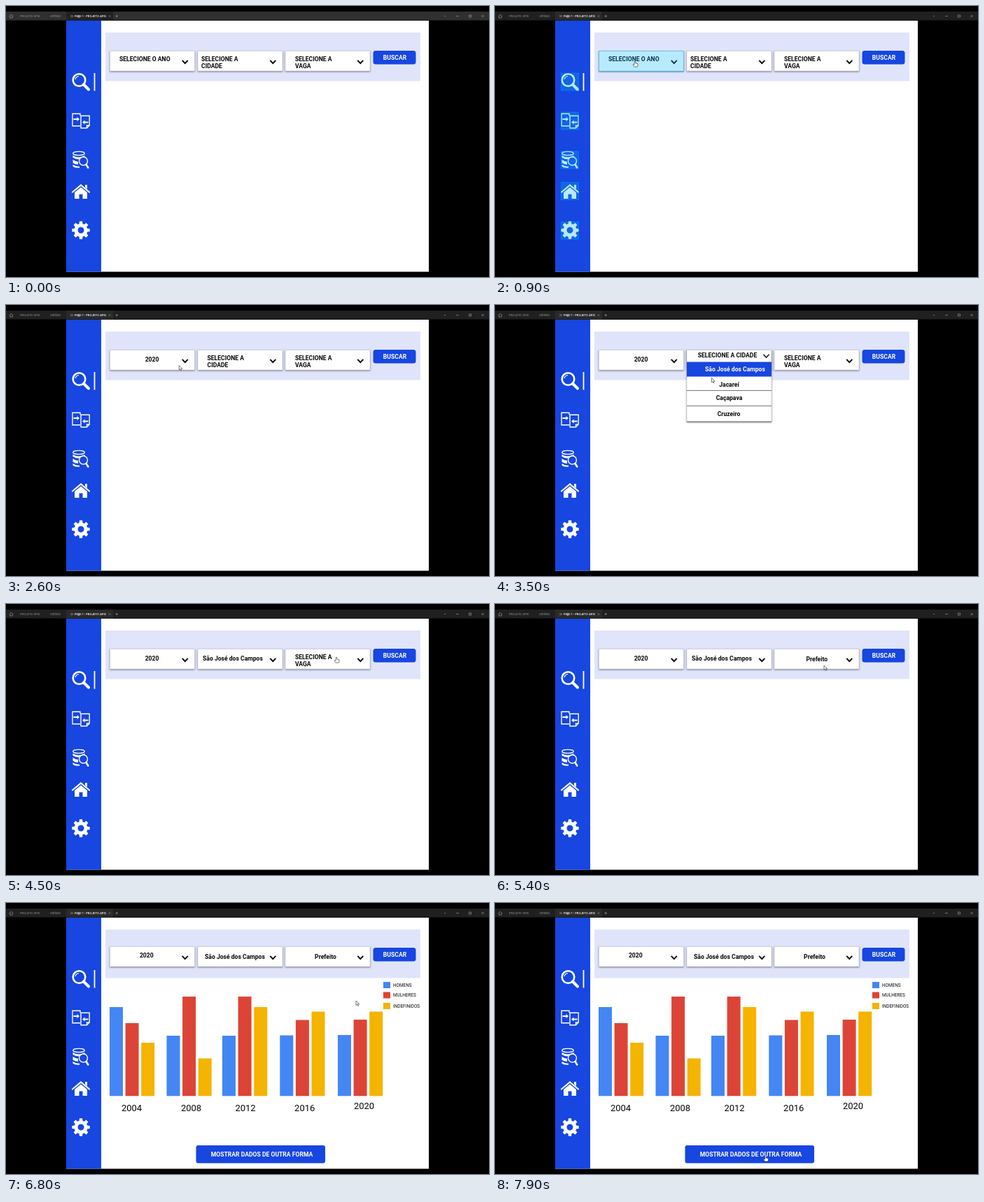
Animation, 690 px wide and 388 px high, one loop 8000 ms. Source, as an HTML page:

```html
<!DOCTYPE html>
<html lang="pt-BR">
<head>
<meta charset="utf-8">
<title>Busca</title>
<style>
html, body { margin: 0; width: 100%; height: 100%; overflow: hidden; background: #000; }
svg { display: block; width: 690px; height: 388px; }
text { font: 700 8.6px Roboto, sans-serif; fill: #050505; }
.mid { text-anchor: middle; }
.light { fill: #fff; }
.tabs text { font: 400 4px Inter, sans-serif; fill: #999; }
.tabs .active { font-weight: 600; fill: #eee; }
.tabs path { fill: none; stroke: #aaa; stroke-width: .6; }
.legend text { font: 400 6.4px Roboto, sans-serif; }
.years text { font: 400 13px Roboto, sans-serif; text-anchor: middle; }
.icons { fill: none; stroke: #fff; stroke-width: 1.6; }
.box { fill: #fff; stroke: #c9cbd8; stroke-width: .6; filter: drop-shadow(0 1.5px .8px #0007); }
.hint rect { fill: #00b4ff; fill-opacity: .28; stroke: #00a8f0; stroke-opacity: .5; stroke-width: .8; }
</style>
</head>
<body>
<svg viewBox="0 0 690 388">
  <defs>
    <path id="chevron" d="M-4 -2.2 0 2.2 4 -2.2" fill="none" stroke="#050505"/>
    <path id="arrow" d="M0 0V6.3L1.5 5 2.6 7.3 3.6 6.8 2.6 4.6H4.6Z" fill="#fff" stroke="#222" stroke-width=".6"/>
    <path id="hand" d="M-.8 .6Q0 -.5 .8 .6V3L4 3.8V6.2L3.2 8H-1L-3 5Q-2.8 3.9 -.8 5Z" fill="#fff" stroke="#222" stroke-width=".6"/>
  </defs>

  <g class="tabs">
    <rect id="tabBar" y="8" width="690" height="12.5"/>
    <rect id="activeTab" x="86" y="8" width="67" height="12.5"/>
    <path d="M5 14.5 7.5 12 10 14.5M5.7 14V17H9.3V14M92 13 94 14.5 92 16M94 13 96 14.5 94 16M147 13.5 149 15.5M149 13.5 147 15.5M156.5 14.5H160M158.2 12.7V16.3M626 14 627 15 628 14M643 14.5H647M661.5 13H664.5V16H661.5ZM679.5 13 682.5 16M682.5 13 679.5 16"/>
    <text x="20" y="16">PROJETO API5</text>
    <text x="63" y="16">Untitled</text>
    <text class="active" x="98" y="16">Page 1 - PROJETO API5</text>
  </g>

  <rect x="86" y="21" width="518" height="359.5" fill="#fff"/>
  <rect x="86" y="21" width="50" height="359.5" fill="#1746e0"/>
  <rect x="142" y="38" width="450" height="69.5" fill="#e0e4fa"/>

  <g class="icons">
    <circle cx="104.5" cy="106" r="8.8" stroke-width="2.6"/>
    <path d="M99 105Q100 101 104 100.5" stroke-width="1.2"/>
    <path d="M111 112.5 118 119.5" stroke-width="4" stroke-linecap="round"/>
    <path d="M126.5 96V121.5" stroke-width="1.8"/>
    <path d="M106 157V154.3H95V171.7H106M107 157.3H119.2V171L115.5 174.8H107ZM115.5 174.8V171H119.2" stroke-width="1.4"/>
    <path d="M96.5 162H102M117.5 166.5H112" stroke-width="1.8"/>
    <path d="M101.5 159 105 162 101.5 165ZM112.5 163.5 109 166.5 112.5 169.5Z" fill="#fff" stroke="none"/>
    <ellipse cx="104" cy="211" rx="8.3" ry="2.7" stroke-width="1.3"/>
    <path d="M95.5 214Q104 219 112.5 214V217Q104 222 95.5 217ZM95.5 220Q100 223 103 222.6V227Q98 227 95.5 224.6ZM95.5 227Q100 230 105 229.6V231.7Q98 232 95.5 229.5Z" fill="#fff" stroke="none"/>
    <circle cx="110.5" cy="222" r="6" fill="#1746e0" stroke-width="1.4"/>
    <path d="M114.5 227 117.3 231.5" stroke-width="2.6" stroke-linecap="round"/>
    <path d="M95 266.5 107 256.5 119 266.5" stroke-width="2.2" stroke-linecap="round"/>
    <path d="M98 267 107 259.5 116 267V276H109.5V269.5H104.5V276H98ZM113 256H116V262L113 259.5Z" fill="#fff" stroke="none"/>
    <circle cx="107" cy="321" r="7" stroke-width="5"/>
    <g id="teeth" fill="#fff" stroke="none"></g>
  </g>

  <g id="closedBoxes"></g>
  <rect x="524.5" y="64" width="61" height="19.5" rx="3.5" fill="#1746e0"/>
  <text class="mid light" x="555.5" y="77">BUSCAR</text>

  <text data-on="0-1500" x="162" y="78.5">SELECIONE O ANO</text>
  <text data-on="2400-6600" class="mid" x="208.5" y="80.5">2020</text>
  <text data-on="6600-8000" class="mid" x="200.8" y="78">2020</text>
  <g data-on="0-1500"><text x="279" y="78.5">SELECIONE A</text><text x="279" y="88.5">CIDADE</text></g>
  <g data-on="1500-3000"><text x="287.5" y="78.5">SELECIONE A</text><text x="287.5" y="88.5">CIDADE</text></g>
  <text data-on="3900-6600" x="281" y="81">São José dos Campos</text>
  <text data-on="6600-8000" x="284" y="80">São José dos Campos</text>
  <g data-on="0-4700"><text x="413" y="78.5">SELECIONE A</text><text x="413" y="88.5">VAGA</text></g>
  <text data-on="5300-6600" class="mid" x="459.8" y="82">Prefeito</text>
  <text data-on="6600-8000" class="mid" x="456.5" y="80">Prefeito</text>
  <g id="menus"></g>

  <g data-on="6600-8000">
    <g id="bars"></g>
    <g class="years" id="years"></g>
    <g class="legend" id="legend"></g>
    <rect x="271.5" y="347" width="184.5" height="25.5" rx="3" fill="#1746e0"/>
    <text class="mid light" x="365.5" y="362.7">MOSTRAR DADOS DE OUTRA FORMA</text>
  </g>

  <g class="hint" id="hints"></g>
  <use id="cursor"/>
</svg>
<script>
const LOOP = 8000, STEP = 100, RESULT = 6600;
const BLUE = '#1746e0';
const byId = id => document.getElementById(id);
const fill = (id, items, draw) => byId(id).innerHTML = items.map(draw).join('');
const rect = (x, y, w, h, attrs = '') => `<rect x="${x}" y="${y}" width="${w}" height="${h}" ${attrs}/>`;
const label = (x, y, text, cls = '') => `<text x="${x}" y="${y}" class="${cls}">${text}</text>`;
const chevron = (x, y, width) => `<use href="#chevron" x="${x}" y="${y}" stroke-width="${width}"/>`;

fill('teeth', [...Array(8).keys()], i =>
  `<path d="M104.2 314 105 308.3H109L109.8 314Z" transform="rotate(${i * 45} 107 321)"/>`);

const columns = [148.5, 274, 399];
fill('closedBoxes', columns, x =>
  rect(x, 64.5, 121, 28.5, 'class="box"') + chevron(x + 107.3, 80, 1.9));

// Each option: text, centre x, baseline.
const menus = [
  { on: '1500-2400', x: 148.5, title: 'SELECIONE O ANO', titleX: 198.5, titleY: 76, arrowY: 71.5, lines: [82.5, 103.5, 124.5, 146, 167.5],
    options: [['2020', 209, 96], ['2016', 208.5, 118.5], ['2012', 208.5, 139.5], ['2008', 207.5, 161]] },
  { on: '3000-3900', x: 274, title: 'SELECIONE A CIDADE', titleX: 332, titleY: 75, arrowY: 73, lines: [81.5, 102.5, 122.5, 144.5, 167],
    options: [['São José dos Campos', 343, 95], ['Jacareí', 334.5, 116.5], ['Caçapava', 334.5, 136], ['Cruzeiro', 334, 158.5]] },
  { on: '4700-5300', x: 399, title: 'SELECIONE A VAGA', titleX: 453, titleY: 76, arrowY: 72, lines: [82.5, 103.5, 124.5],
    options: [['Prefeito', 459.8, 96], ['Vereador', 459.8, 118]] }
];
fill('menus', menus, ({ on, x, title, titleX, titleY, arrowY, lines, options }) => {
  const bottom = lines[lines.length - 1];
  return `<g data-on="${on}">` +
    rect(x, 64.5, 121, bottom - 64.5, 'class="box"') +
    rect(x, lines[0], 121, lines[1] - lines[0], `fill="${BLUE}"`) +
    lines.slice(2).map(y => rect(x, y - .4, 121, .8, 'fill="#555"')).join('') +
    label(titleX, titleY, title, 'mid') + chevron(x + (x === 274 ? 113.5 : 107.3), arrowY, 1.3) +
    options.map(([text, cx, y], i) => label(cx, y, text, i ? 'mid' : 'mid light')).join('') + '</g>';
});

const series = [['HOMENS', '#4486f4', 113, 120.3], ['MULHERES', '#dc4437', 127.5, 134.3], ['INDEFINIDOS', '#f4b400', 143, 149.8]];
// Left edge, bar tops, label centre.
const groups = [
  [148, [149, 172, 200], 179.5], [229.5, [190, 134, 222.5], 264.5], [309, [190, 134, 149], 342],
  [391.3, [189.5, 167.5, 155.5], 426.7], [474, [189, 167, 155.5], 511.5]
];
fill('bars', groups, ([x, tops]) => tops.map((y, i) =>
  rect(x + i * 22.6, y, 19, 276.3 - y, `fill="${series[i][1]}"`)).join(''));
fill('years', groups, (g, i) => label(g[2], i === 4 ? 294.7 : 297.7, 2004 + i * 4));
fill('legend', series, ([name, color, y, base]) => rect(539, y, 10, 9, `fill="${color}"`) + label(553, base, name));
fill('hints', [96, 152, 208, 252.5, 309], y => rect(94.3, y, 25.2, 25));
byId('hints').innerHTML += rect(148.5, 64.5, 121, 29.5);

// Time, pointer tip x and y, shape from then on.
const path = [
  [600, 236, 120, 'arrow'], [800, 200, 79, 'hand'], [1300, 200, 79, 'hand'], [1500, 215, 78, 'arrow'],
  [1700, 233, 76, 'arrow'], [2000, 216, 92, 'hand'], [2400, 212, 92, 'hand'], [2500, 220, 90, 'arrow'],
  [2800, 325, 77, 'hand'], [3000, 325, 77, 'arrow'], [3500, 309.5, 104.5, 'arrow'], [3700, 328, 91, 'hand'],
  [3900, 330, 91, 'hand'], [4000, 350, 88, 'arrow'], [4400, 472, 76, 'hand'], [4700, 472, 76, 'arrow'],
  [5000, 458, 92, 'hand'], [5300, 458, 92, 'hand'], [5400, 470, 88, 'arrow'], [5900, 569.5, 73, 'hand'],
  [6500, 569.5, 73, 'hand'], [6600, 560, 80, 'arrow'], [6800, 500, 140, 'arrow'], [7500, 386.5, 362, 'hand'],
  [8000, 386.5, 362, 'hand']
];

const timed = [...document.querySelectorAll('[data-on]')].map(node => {
  const [from, to] = node.dataset.on.split('-').map(Number);
  return { node, from, to };
});

function moveCursor(t) {
  const cursor = byId('cursor');
  cursor.style.display = t < path[0][0] ? 'none' : '';
  if (t < path[0][0]) return;
  const next = path.findIndex(p => p[0] > t);
  const a = path[next - 1], b = path[next];
  const u = (t - a[0]) / (b[0] - a[0]), ease = u * u * (3 - 2 * u);
  cursor.setAttribute('href', '#' + a[3]);
  cursor.setAttribute('x', a[1] + (b[1] - a[1]) * ease);
  cursor.setAttribute('y', a[2] + (b[2] - a[2]) * ease);
}

function render() {
  const t = Math.floor(performance.now() % LOOP / STEP) * STEP;
  for (const { node, from, to } of timed) node.style.display = t >= from && t < to ? '' : 'none';
  byId('closedBoxes').setAttribute('transform', `translate(0 ${t < RESULT ? 0 : -2})`);
  byId('tabBar').setAttribute('fill', t < 600 ? '#303030' : '#202020');
  byId('activeTab').setAttribute('fill', t < 600 ? '#222' : '#2a2a2a');
  byId('hints').style.opacity = t < 600 ? 0 : Math.max(0, Math.min(1, (1300 - t) / 300));
  moveCursor(t);
  requestAnimationFrame(render);
}
render();
</script>
</body>
</html>
```
